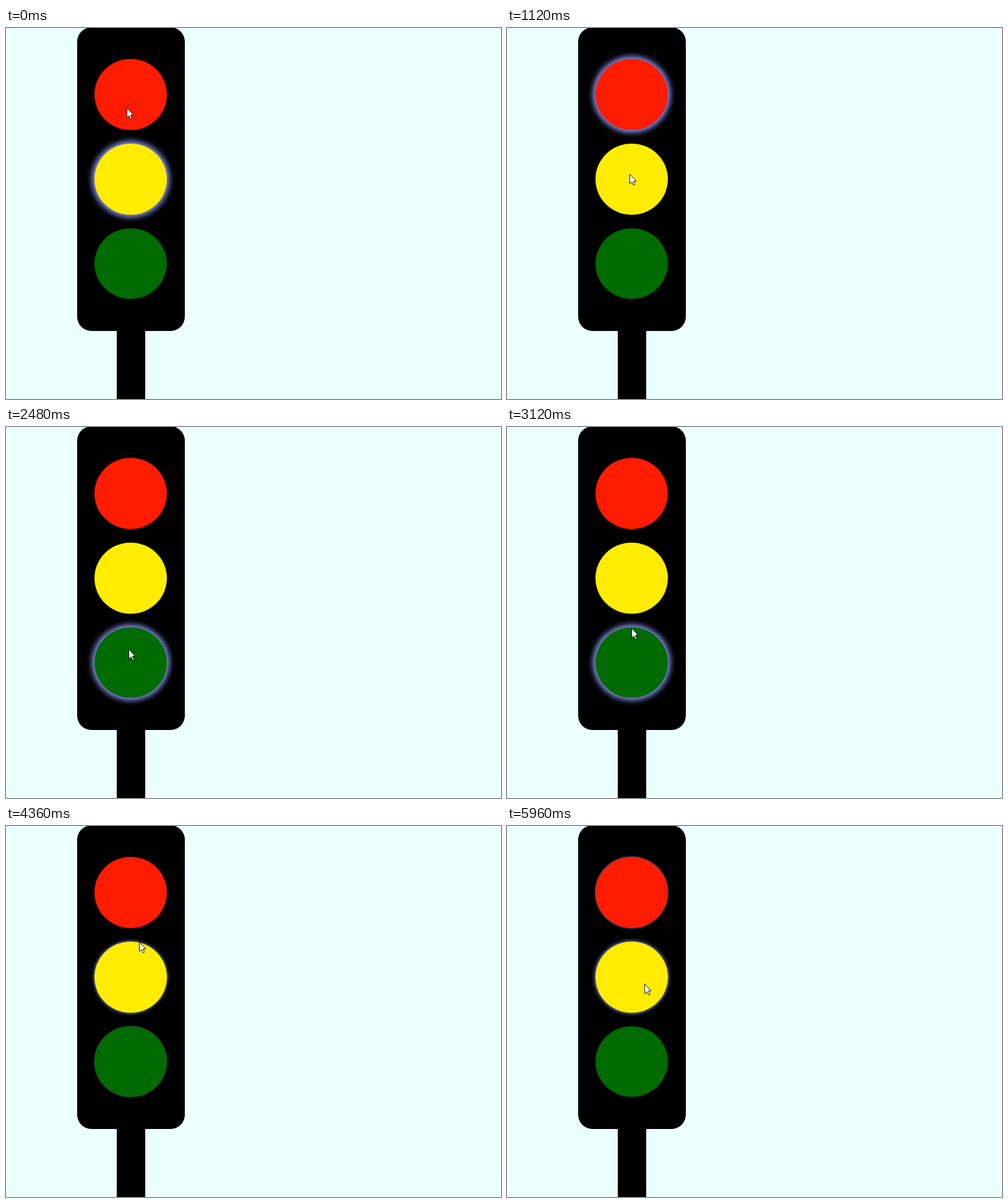
These frames come from a looping animation (800x600 px, 6 s). An HTML page:

```html
<!DOCTYPE html>
<html lang="en">
<head>
<meta charset="utf-8">
<title>Traffic light</title>
<style>
  html, body { margin: 0; width: 100%; height: 100%; overflow: hidden; background: #ebffff; }
  #stage { position: relative; width: 800px; height: 600px; overflow: hidden; }
  #stage > * { position: absolute; }
  .case { left: 114.5px; top: -1px; width: 174.7px; height: 491px; border-radius: 23px; background: #000; }
  .pole { left: 179px; top: 485px; width: 46px; height: 115px; background: #000; }
  .lamp { left: 143px; width: 117px; height: 114.5px; border-radius: 50%; }
  #red { top: 50px; background: #ff1c00; }
  #yellow { top: 187px; background: #ffec00; }
  #green { top: 323.8px; background: #006b00; }
  #cursor { left: 0; top: 0; overflow: visible; }
</style>
</head>
<body>
<div id="stage">
  <div class="case"></div>
  <div class="pole"></div>
  <div class="lamp" id="red"></div>
  <div class="lamp" id="yellow"></div>
  <div class="lamp" id="green"></div>
  <svg id="cursor" width="12" height="20">
    <path d="M.5 .5V16L4 12.8 6.4 18.2 8.8 17.2 6.5 11.8H11Z" fill="#fff" stroke="#111" stroke-width="1" stroke-linejoin="round"/>
  </svg>
</div>
<script>
const LOOP = 6000, STEP = 40, FADE = 240;
const el = id => document.getElementById(id);

// Spans in ms: when each lamp starts to light up and when it starts to go out.
const spans = {
  red: [[480, 1240], [5900, Infinity]],
  yellow: [[-LOOP, 400], [1320, 1880], [4260, 5840]],
  green: [[1980, 4160]]
};

// Pointer tip: time, x, y.
const path = [
  [0, 195, 129], [1120, 198, 236], [1640, 200, 326], [2480, 198, 359],
  [3800, 207, 258], [4960, 221, 137], [5960, 222, 255]
];

const ramp = v => Math.min(1, Math.max(0, v));
const level = (list, t) => Math.max(...list.map(([on, off]) =>
  Math.min(ramp((t - on) / FADE), 1 - ramp((t - off) / FADE))));

function slope(i, axis) {
  if (i === 0 || i === path.length - 1) return 0;
  const a = path[i - 1], b = path[i], c = path[i + 1];
  const before = (b[axis] - a[axis]) / (b[0] - a[0]);
  const after = (c[axis] - b[axis]) / (c[0] - b[0]);
  return before * after > 0 ? 2 * before * after / (before + after) : 0;
}

// Monotone cubic through the path points.
function pointAt(t, axis) {
  let i = 0;
  while (i < path.length - 2 && t >= path[i + 1][0]) i++;
  const a = path[i], b = path[i + 1], d = b[0] - a[0], u = ramp((t - a[0]) / d);
  const s = u * u * (3 - 2 * u);
  return a[axis] * (1 - s) + b[axis] * s
    + d * u * (1 - u) * ((1 - u) * slope(i, axis) - u * slope(i + 1, axis));
}

function draw(t) {
  for (const id in spans) {
    const p = level(spans[id], t);
    el(id).style.boxShadow = p
      ? `0 0 ${10 * p}px ${4 * p}px rgba(138, 152, 245, ${Math.sqrt(p)})` : 'none';
  }
  const x = Math.round(pointAt(t, 1)), y = Math.round(pointAt(t, 2));
  el('cursor').style.transform = `translate(${x}px, ${y}px)`;
}

const start = performance.now();
function tick(now) {
  const t = Math.max(0, now - start) % LOOP;
  draw(Math.floor(t / STEP) * STEP);
  requestAnimationFrame(tick);
}
draw(0);
requestAnimationFrame(tick);
</script>
</body>
</html>
```
